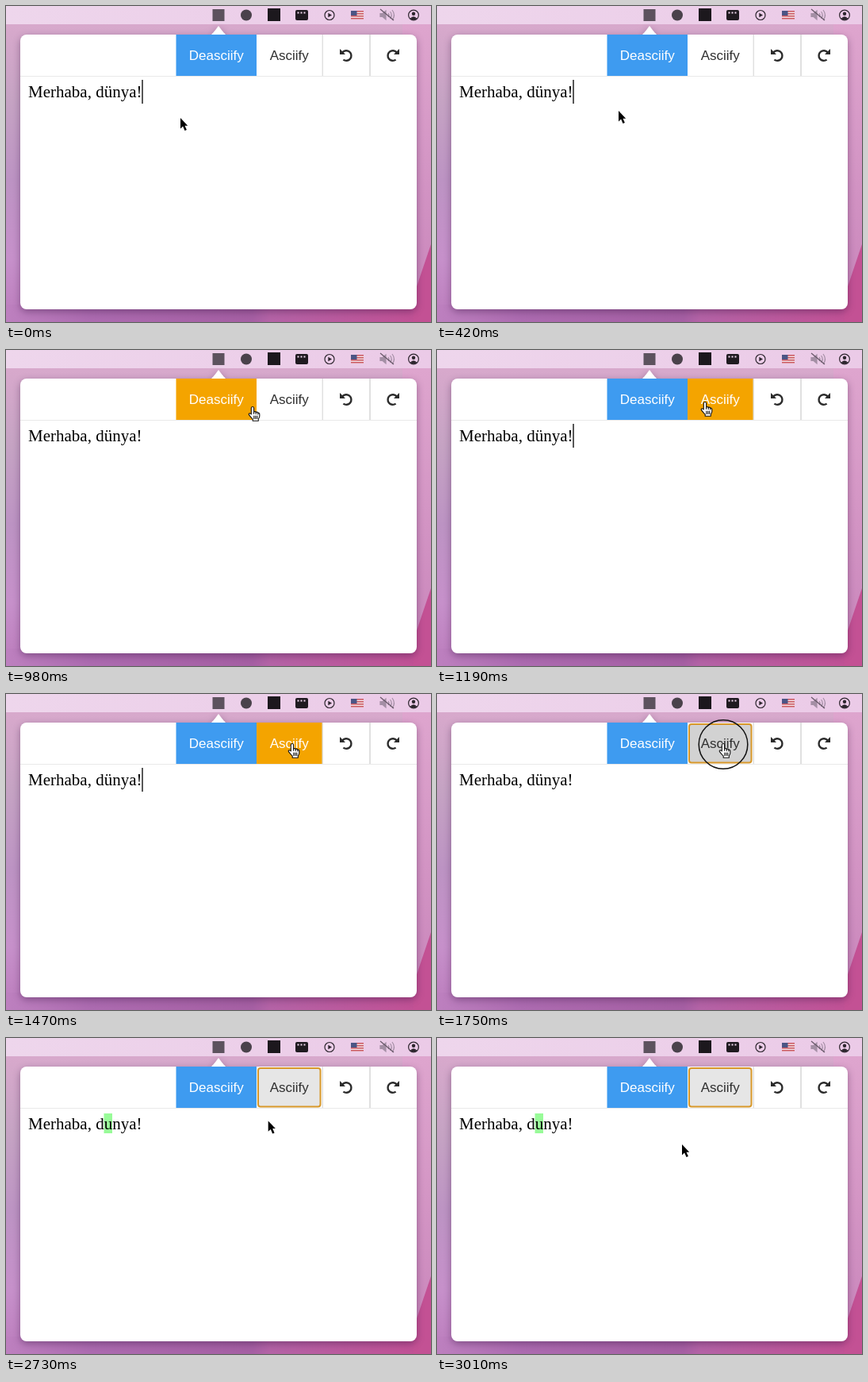
An HTML page that plays this animation: 536x398 px, repeating every 3.22 s.

```html
<!DOCTYPE html>
<html lang="en">
<head>
<meta charset="utf-8">
<title>Text converter popover</title>
<style>
  html, body { margin: 0; width: 100%; height: 100%; overflow: hidden; }
  svg { display: block; width: 536px; height: 398px; }
  .label { font: 17px "Liberation Sans", Arial, sans-serif; text-anchor: middle; }
  .entry { font: 21px "Liberation Serif", "Times New Roman", serif; }
  .window { filter: drop-shadow(0 3px 5px rgba(50, 15, 60, .4)); }
</style>
</head>
<body>
<svg viewBox="0 0 536 398">
  <defs>
    <linearGradient id="wall" x2="0" y2="1">
      <stop offset="0" stop-color="#dcaace"/>
      <stop offset=".3" stop-color="#c5a3c3"/>
      <stop offset=".55" stop-color="#bc93c3"/>
      <stop offset=".8" stop-color="#c690ca"/>
      <stop offset="1" stop-color="#bb7cbc"/>
    </linearGradient>
    <linearGradient id="floor">
      <stop offset="0" stop-color="#bd80bf"/>
      <stop offset=".2" stop-color="#ac6bb0"/>
      <stop offset=".58" stop-color="#a55fa3"/>
      <stop offset=".62" stop-color="#b463a6"/>
      <stop offset="1" stop-color="#c24f93"/>
    </linearGradient>
    <linearGradient id="side" x2="0" y2="1">
      <stop offset="0" stop-color="#dea5ce"/>
      <stop offset="1" stop-color="#c884ba"/>
    </linearGradient>
    <linearGradient id="bar">
      <stop offset="0" stop-color="#eed6ec"/>
      <stop offset="1" stop-color="#ebcae7"/>
    </linearGradient>
    <g id="turn" fill="none" stroke="#2b2b2b" stroke-width="2.4">
      <path d="M-4.6-3.6A6.3 6.3 0 1 1-3.6 5.6"/>
      <path d="M-8-8V-1H-1Z" fill="#2b2b2b" stroke="none"/>
    </g>
  </defs>

  <!-- Desktop -->
  <rect width="536" height="398" fill="url(#wall)"/>
  <rect x="500" y="23" width="36" height="375" fill="url(#side)"/>
  <rect y="376" width="536" height="22" fill="url(#floor)"/>
  <path d="M536 300L514 365V398H536Z" fill="#c35194"/>

  <!-- Menu bar -->
  <rect width="536" height="23" fill="url(#bar)"/>
  <rect x="260.5" y="4" width="15" height="15" fill="#5d525e"/>
  <circle cx="303" cy="11.5" r="7" fill="#4a424b"/>
  <rect x="330" y="3" width="16" height="16" fill="#1c181d"/>
  <rect x="365" y="5" width="16" height="13" rx="2" fill="#1f1a20"/>
  <path d="M367.5 8.5h2m2 0h2m2 0h2" stroke="#eed6ec" stroke-width="2"/>
  <g fill="none" stroke="#2d262e" stroke-width="1.2">
    <circle cx="408" cy="11.5" r="6"/>
    <path d="M406.3 8.7V14.3L411 11.5Z" fill="#2d262e" stroke="none"/>
    <circle cx="514" cy="11.5" r="6.4"/>
    <circle cx="514" cy="9.7" r="2.2" fill="#2d262e" stroke="none"/>
    <path d="M509.7 15.7Q514 10.6 518.3 15.7Q514 19.3 509.7 15.7Z" fill="#2d262e" stroke="none"/>
  </g>
  <rect x="435" y="6" width="16" height="11" fill="#f2dfe4"/>
  <path d="M435 6.7h16m-16 3h16m-16 3h16m-16 3h16" stroke="#c9565f" stroke-width="1.4"/>
  <rect x="435" y="6" width="7.5" height="6" fill="#4b5585"/>
  <g fill="none" stroke="#a48fa5" stroke-width="1.2">
    <path d="M472 9.5h3l4-3.5v11l-4-3.5h-3Z" fill="#a48fa5"/>
    <path d="M482 9q2 2.5 0 5m2.5-7q3.5 4.5 0 9m2.5-11q5 6.5 0 13"/>
    <path d="M472 4L489 18" stroke="#655666"/>
  </g>

  <!-- Popover -->
  <g class="window" fill="#fff">
    <rect x="18" y="36" width="500" height="346" rx="8"/>
    <path d="M258 36.5Q260 36 268 25Q276 36 278 36.5Z"/>
  </g>
  <path d="M18 88.5H518" stroke="#e9e9e9"/>
  <path d="M399 36V88M459 36V88" stroke="#d9d9d9" stroke-width="1.6"/>
  <rect id="firstFill" x="214.5" y="36" width="101.5" height="52"/>
  <text class="label" x="265.2" y="68" fill="#fff">Deasciify</text>
  <rect id="secondFill" x="316" y="36" width="82.5" height="52"/>
  <rect id="focusRing" x="318" y="38" width="78.5" height="48.5" rx="3" stroke-width="2"/>
  <text class="label" id="secondLabel" x="357.2" y="68">Asciify</text>
  <use href="#turn" x="429" y="62"/>
  <use href="#turn" transform="translate(488 62) scale(-1 1)"/>

  <rect id="mark" x="123.5" y="95" width="10.5" height="25" fill="#98fb98"/>
  <text class="entry" id="entry" x="28" y="114.5"></text>
  <path id="caret" d="M172 93V123" stroke="#111" stroke-width="1.4"/>

  <circle id="click" cx="361" cy="63.5" r="30.8" fill="none" stroke="#111" stroke-width="1.5"/>
  <g id="pointer">
    <path id="arrow" d="M0 0V13.4L3.1 10.6L5.5 16L7.9 15L5.5 9.7H9.2Z"
      stroke="#fff" stroke-width="1.8" stroke-linejoin="round" paint-order="stroke"/>
    <g id="hand" stroke="#111" stroke-width="1.1" stroke-linejoin="round" stroke-linecap="round">
      <path fill="#fff" d="M-1.7 9V1Q-1.4-.5 0-.5Q1.4-.5 1.6 1V6Q3.2 4.8 4.2 6.4Q6 5.6 6.8 7.2Q8.6 6.8 8.8 8.8V11.5Q8.6 13.2 7.3 15V17.2H.2V15.2Q-1.6 13.4-4.6 9.6Q-5.2 8-3.6 7.7Q-2.6 7.8-1.7 9Z"/>
      <path fill="none" d="M1.6 6V8.3M4.2 6.4V8.6M6.8 7.2V9M1.8 11V14.4M3.8 11V14.4M5.8 11V14.4"/>
    </g>
  </g>
</svg>
<script>
  const LOOP = 3220, STEP = 70;
  const PRESS = 1610, RELEASE = 1820, CLICK_END = 1890;
  const BLUE = '#3e9bf0', ORANGE = '#f4a400';
  const byId = id => document.getElementById(id);

  // Pointer hot spot: time, x, y
  const route = [
    [0, 220, 141], [420, 229, 132], [560, 242, 109], [770, 278, 84],
    [980, 311, 72], [1190, 338, 66], [1470, 361, 63], [2380, 361, 63]
  ];
  const mix = (a, b, k) => a + (b - a) * k;

  function pointerAt(t) {
    if (t >= 2380) {
      const k = Math.min(1, (t - 2380) / 630), ease = k * k * (3 - 2 * k);
      return [mix(361, 309, ease), mix(63, 134, ease)];
    }
    const i = route.findIndex(p => p[0] > t);
    const [t0, x0, y0] = route[i - 1], [t1, x1, y1] = route[i];
    const k = (t - t0) / (t1 - t0);
    return [mix(x0, x1, k), mix(y0, y1, k)];
  }

  function show(id, visible) {
    byId(id).style.display = visible ? '' : 'none';
  }

  function draw(t) {
    const [x, y] = pointerAt(t);
    const inBar = y < 88;
    const overFirst = inBar && x < 316, overSecond = inBar && x >= 316;
    const pressed = t >= PRESS && t < RELEASE;
    const focused = t >= PRESS, converted = t >= RELEASE;
    const lit = overSecond && !pressed;
    const face = pressed ? '#d2d2d2' : lit ? ORANGE : focused ? '#e6e6e6' : '#fff';

    byId('firstFill').setAttribute('fill', overFirst ? ORANGE : BLUE);
    byId('secondFill').setAttribute('fill', focused ? '#fff' : face);
    byId('focusRing').setAttribute('fill', face);
    byId('focusRing').setAttribute('stroke', lit ? '#bd7c0c' : '#d8982a');
    byId('secondLabel').setAttribute('fill', lit ? '#fff' : '#2f2f2f');
    byId('entry').textContent = converted ? 'Merhaba, dunya!' : 'Merhaba, dünya!';
    byId('pointer').setAttribute('transform', `translate(${x} ${y})`);

    show('focusRing', focused);
    show('mark', converted);
    show('caret', t < 630 || (t >= 1190 && t < PRESS));
    show('click', t >= PRESS && t < CLICK_END);
    show('hand', inBar);
    show('arrow', !inBar);
  }

  const start = performance.now();
  function tick() {
    const t = (performance.now() - start) % LOOP;
    draw(Math.floor(t / STEP) * STEP);
    requestAnimationFrame(tick);
  }
  tick();
</script>
</body>
</html>
```
